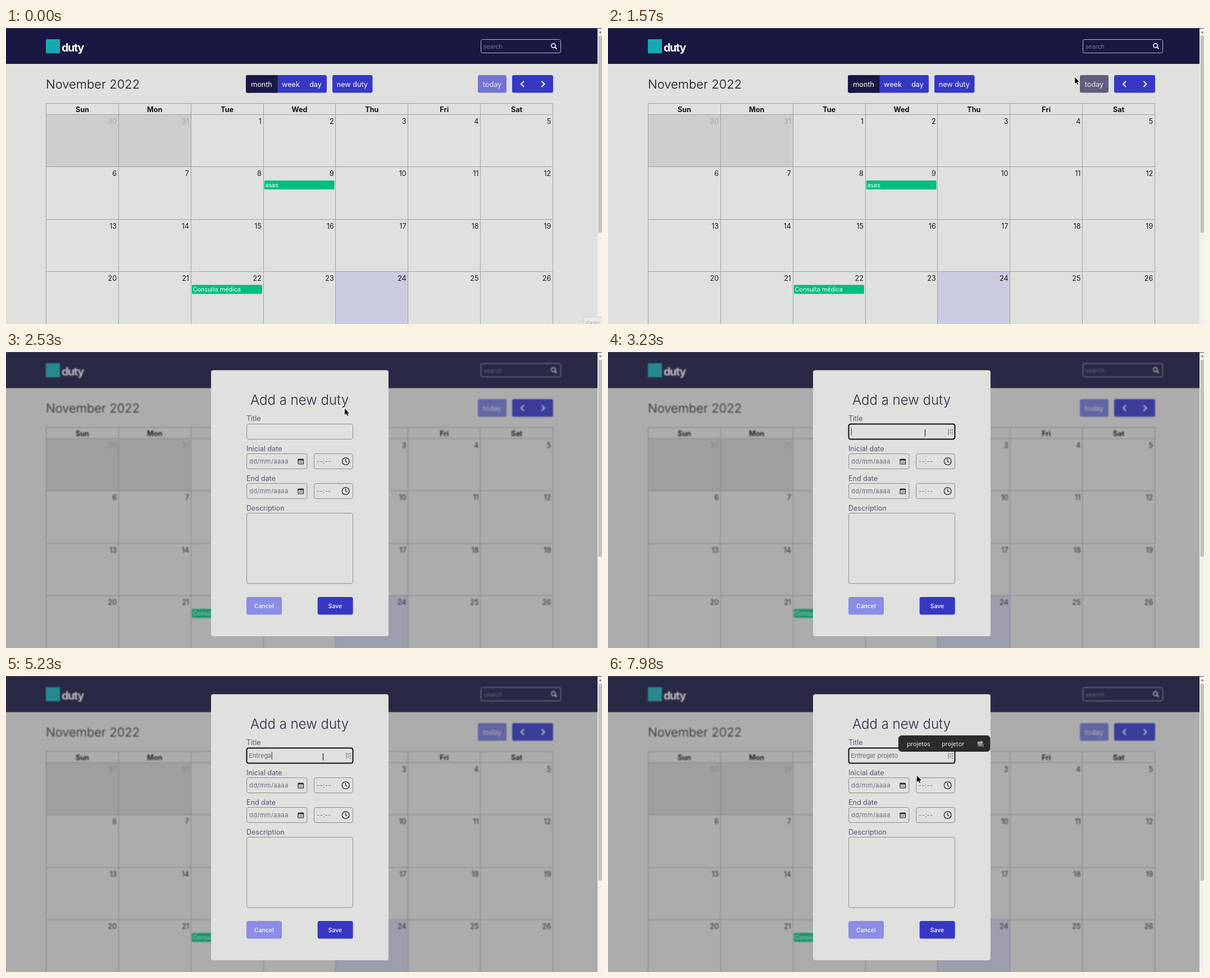
Write an HTML page that moves like this. It is 1061 by 528 pixels and loops after 8 s.

```html
<!DOCTYPE html>
<html lang="en">
<head>
<meta charset="utf-8">
<title>Calendar</title>
<style>
html, body { margin: 0; width: 100%; height: 100%; overflow: hidden; background: #e0e0de; }
svg { display: block; width: 100%; height: 100%; font: 12.64px Inter, sans-serif; }
.blurred { filter: blur(1px); }
</style>
</head>
<body>
<svg id="stage" viewBox="0 0 1061 528" preserveAspectRatio="none"></svg>
<script>
const NAVY = '#191842', BLUE = '#3638c4', PAGE = '#e0e0de', LINE = '#a2a2a2', INK = '#58566f';

const rect = (x, y, w, h, fill, extra = '') =>
  `<rect x="${x}" y="${y}" width="${w}" height="${h}" fill="${fill}" ${extra}/>`;
const text = (x, y, str, fill, extra = '') =>
  `<text x="${x}" y="${y}" fill="${fill}" ${extra}>${str}</text>`;
const path = (d, stroke, width = 1, extra = '') =>
  `<path d="${d}" fill="none" stroke="${stroke}" stroke-width="${width}" ${extra}/>`;
const size = (px, weight = 400) => `font-size="${px}" font-weight="${weight}"`;
const MIDDLE = 'text-anchor="middle"', END = 'text-anchor="end"';

function header() {
  return rect(-10, -10, 1081, 74, NAVY) +
    rect(71, 20, 25, 25, '#17a9b3') +
    text(99, 42, 'duty', '#fff', size(19.5, 700) + ' letter-spacing="-1.2"') +
    rect(845.5, 20.5, 142, 24, 'none', 'rx="3" stroke="#b9b9c6"') +
    text(850, 36.5, 'search', '#77768a', size(10.55)) +
    '<circle cx="974.5" cy="31.3" r="3.6" fill="none" stroke="#fff" stroke-width="1.5"/>' +
    path('M977.2 34L980.5 37.3', '#fff', 1.8);
}

function toolbar() {
  const label = (x, str) => text(x, 104.5, str, '#fff', MIDDLE);
  return text(71, 107.5, 'November 2022', '#111', size(22, 300)) +
    rect(427, 84, 144, 31.5, BLUE, 'rx="3"') +
    rect(427, 84, 10, 31.5, NAVY, 'rx="3"') + rect(430, 84, 53.5, 31.5, NAVY) +
    label(455, 'month') + label(507, 'week') + label(551, 'day') +
    rect(581, 84, 71.5, 31.5, BLUE, 'id="add" rx="3"') + label(616.3, 'new duty') +
    rect(840, 84, 51, 31.5, '#7374d1', 'id="today" rx="3"') +
    text(865.5, 104.5, 'today', '#e8e8f4', MIDDLE) +
    rect(901, 84, 73, 31.5, BLUE, 'rx="3"') +
    path('M922 95L917 100L922 105M953.5 95L958.5 100L953.5 105', '#fff', 2);
}

function calendar() {
  const colX = i => 71.5 + i * 128.86, rowY = i => 154.5 + i * 93.3;
  let out = rect(71.5, 154.5, 257.7, 93.3, '#cdcdcd') +
    rect(colX(4), rowY(3), 128.86, 100, '#cacae0');
  for (let c = 0; c < 8; c++) {
    const x = Math.floor(colX(c)) + .5;
    out += path(c % 7 ? `M${x} 134V540` : `M${x} 134V540`, LINE);
  }
  for (const y of [134.5, 154.5, 247.5, 341.5, 434.5]) out += path(`M71 ${y}H974`, LINE);
  ['Sun', 'Mon', 'Tue', 'Wed', 'Thu', 'Fri', 'Sat'].forEach((day, c) => {
    out += text(colX(c) + 64.4, 149.5, day, '#111', size(12.64, 700) + MIDDLE);
    for (let r = 0; r < 4; r++) {
      const n = r * 7 + c - 1;
      out += text(colX(c + 1) - 3.2, rowY(r) + 16.5, n > 0 ? n : n + 31, n > 0 ? '#1c1c1c' : '#a5a5a5', END);
    }
  });
  const event = (x, y, str) => rect(x, y, 125, 16, '#00bf7e', 'rx="2"') +
    text(x + 1.7, y + 12, str, '#fff', size(10.75));
  return out + event(459.7, 272, 'asas') + event(331, 458.3, 'Consulta médica');
}

function dateRow(y, label) {
  const box = (x, w) => rect(x, y + 9.5, w, 27, 'none', 'rx="3.5" stroke="#8d8d92"');
  const hint = (x, str) => text(x, y + 27.3, str, '#6f6d82', size(11) + ' letter-spacing=".45"');
  return text(428, y + 4.5, label, INK, size(12.5)) +
    box(428.5, 107.5) + box(548.5, 69) + hint(433, 'dd/mm/aaaa') + hint(553, '--:--') +
    rect(520, y + 19.2, 9.5, 8.8, 'none', 'rx="1" stroke="#222" stroke-width="1.2"') +
    path(`M519.5 ${y + 20.5}H530`, '#222', 2) +
    path(`M522 ${y + 23.8}H528M522 ${y + 26}H528`, '#333', 1.2, 'stroke-dasharray="1.2 1"') +
    `<circle cx="604.7" cy="${y + 23}" r="6.4" fill="none" stroke="#222" stroke-width="1.3"/>` +
    path(`M604.7 ${y + 18.8}V${y + 23.3}L607.5 ${y + 24.8}`, '#222', 1.2);
}

function dialog() {
  const button = (x, str, fill) => rect(x, 437, 63, 31.5, fill, 'rx="3.5"') +
    text(x + 31.3, 456.7, str, '#fff', size(10.4, 500) + MIDDLE);
  return rect(0, 0, 1053, 528, 'rgba(70,70,75,.34)') +
    rect(365, 32.5, 316, 474.5, PAGE, 'rx="4"') +
    text(522.5, 93.5, 'Add a new duty', '#2c2b45', size(24, 300) + MIDDLE) +
    text(428, 123.3, 'Title', INK, size(12.5)) +
    rect(428.5, 128.5, 189, 27, 'none', 'id="title" rx="3.5" stroke="#8d8d92"') +
    `<g id="badge">${path('M606 136.5V148', '#8a8a8a', 1.4)}${path('M609.3 138V147M612.8 137V148', '#8a8a8a', 1.8, 'stroke-dasharray="3 1.5"')}</g>` +
    text(432.3, 146.2, '', '#6b6a78', 'id="typed" xml:space="preserve" ' + size(11)) +
    rect(433, 135, 1, 14, '#333', 'id="caret"') +
    dateRow(172, 'Inicial date') + dateRow(225, 'End date') +
    text(428, 282.5, 'Description', INK, size(12.5)) +
    rect(428.5, 287.5, 189, 125.5, 'none', 'rx="3.5" stroke="#8d8d92"') +
    button(428, 'Cancel', '#8b8ce6') + button(554.7, 'Save', BLUE);
}

function suggestions() {
  const word = (x, str) => text(x, 125, str, '#fff', 'font-family="Open Sans, sans-serif" ' + size(10.7));
  return rect(517.5, 106.5, 162.5, 28, '#2b2b2b', 'rx="5" stroke="#222"') +
    word(532.3, 'projetos') + word(594, 'projetor') +
    '<g fill="#a5a5a5"><circle cx="660" cy="119" r="2.5"/><circle cx="664.7" cy="118.7" r="2.7"/></g>' +
    rect(658.5, 121, 7, 4.5, '#8c8c8c', 'rx="1"') + path('M666 122.5L668 121.5V126L665 125', '#a5a5a5');
}

function scrollbar() {
  return rect(1053, 0, 8, 528, '#f1f1f1') + rect(1054.5, 14, 6.5, 351, '#c1c1c1') +
    '<path d="M1055.5 9L1058 5.5L1060.5 9Z" fill="#777"/>' + rect(0, 0, 1061, 1, '#4a4a55');
}

document.getElementById('stage').innerHTML =
  rect(0, 0, 1061, 528, PAGE) + rect(0, 0, 1061, 64, NAVY) +
  `<g id="page">${header()}${toolbar()}${calendar()}</g>` +
  `<g id="dialog">${dialog()}</g>` + scrollbar() +
  `<g id="hint">${rect(1028.5, 515.5, 40, 20, '#e9e9e9', 'stroke="#cfcfcf"')}${text(1032, 531, 'Grav', '#aaa', size(11))}</g>` +
  `<g id="popup">${suggestions()}</g>` +
  '<path id="arrow" d="M0 0V11.2L2.6 8.8L4.4 12.8L6.2 12L4.5 8.2H8Z" fill="#000" stroke="#fff" stroke-width="1.4" paint-order="stroke"/>' +
  path('M.5 -6V6.5', '#000', 1.1, 'id="beam"');

const el = {};
document.querySelectorAll('[id]').forEach(node => el[node.id] = node);
const show = (node, on) => node.setAttribute('visibility', on ? 'inherit' : 'hidden');
const setAll = (node, attrs) => Object.entries(attrs).forEach(([k, v]) => node.setAttribute(k, v));

const PHRASE = 'Entregar projeto';
const KEY_TIMES = [4020, 4230, 4430, 4630, 4830, 5040, 5230, 5430, 5560, 5920, 6120, 6320, 6710, 6780, 6980, 7110];
const FOCUS = 3150, OPEN = 2530, CLICK = 2330;

// time, x, y of the pointer
const POINTER = [
  [550, 984, 497], [1300, 864, 114], [1366, 851, 103], [1570, 831, 88], [2115, 595, 93.5],
  [2190, 603, 94], [2330, 603, 100], [2530, 603, 101], [3065, 564, 144], [7690, 564, 144], [7970, 550, 178.5]
];

function pointerAt(time) {
  const t = 6 + 68 * Math.floor((time - 6) / 68);
  const next = POINTER.findIndex(p => p[0] > t);
  if (next < 0) return POINTER[POINTER.length - 1].slice(1);
  if (next === 0) return POINTER[0].slice(1);
  const [t0, x0, y0] = POINTER[next - 1], [t1, x1, y1] = POINTER[next];
  const u = (t - t0) / (t1 - t0), k = u * u * (3 - 2 * u);
  return [x0 + (x1 - x0) * k, y0 + (y1 - y0) * k];
}

function draw(t) {
  const open = t >= OPEN, focused = t >= FOCUS;
  const [x, y] = pointerAt(t).map(Math.round);
  show(el.hint, t < 70);
  show(el.dialog, open);
  el.page.setAttribute('class', open ? 'blurred' : '');

  const overAdd = t > 1570 && x < 653;
  setAll(el.add, {
    fill: overAdd ? NAVY : BLUE,
    stroke: t >= CLICK ? '#8f909f' : 'none', 'stroke-width': 3, 'paint-order': 'stroke'
  });
  el.today.setAttribute('fill', t >= 1370 && t < 1640 ? '#605e7c' : '#7374d1');

  setAll(el.title, { stroke: focused ? '#0c0c10' : '#8d8d92', 'stroke-width': focused ? 2 : 1 });
  show(el.badge, t >= 3230);
  const count = KEY_TIMES.filter(k => k <= t).length;
  el.typed.textContent = PHRASE.slice(0, count);
  const lastKey = count ? KEY_TIMES[count - 1] : FOCUS;
  show(el.caret, focused && (t - lastKey) % 1060 < 530);
  el.caret.setAttribute('x', 432.8 + (count ? el.typed.getComputedTextLength() : 0));
  show(el.popup, t >= 7710);

  const overTitle = open && x > 428 && x < 618 && y > 128 && y < 156;
  for (const node of [el.arrow, el.beam]) node.setAttribute('transform', `translate(${x} ${y})`);
  show(el.arrow, t >= 550 && !overTitle);
  show(el.beam, overTitle);
}

function frame() {
  draw(performance.now() % 8000);
  requestAnimationFrame(frame);
}
frame();
</script>
</body>
</html>
```
